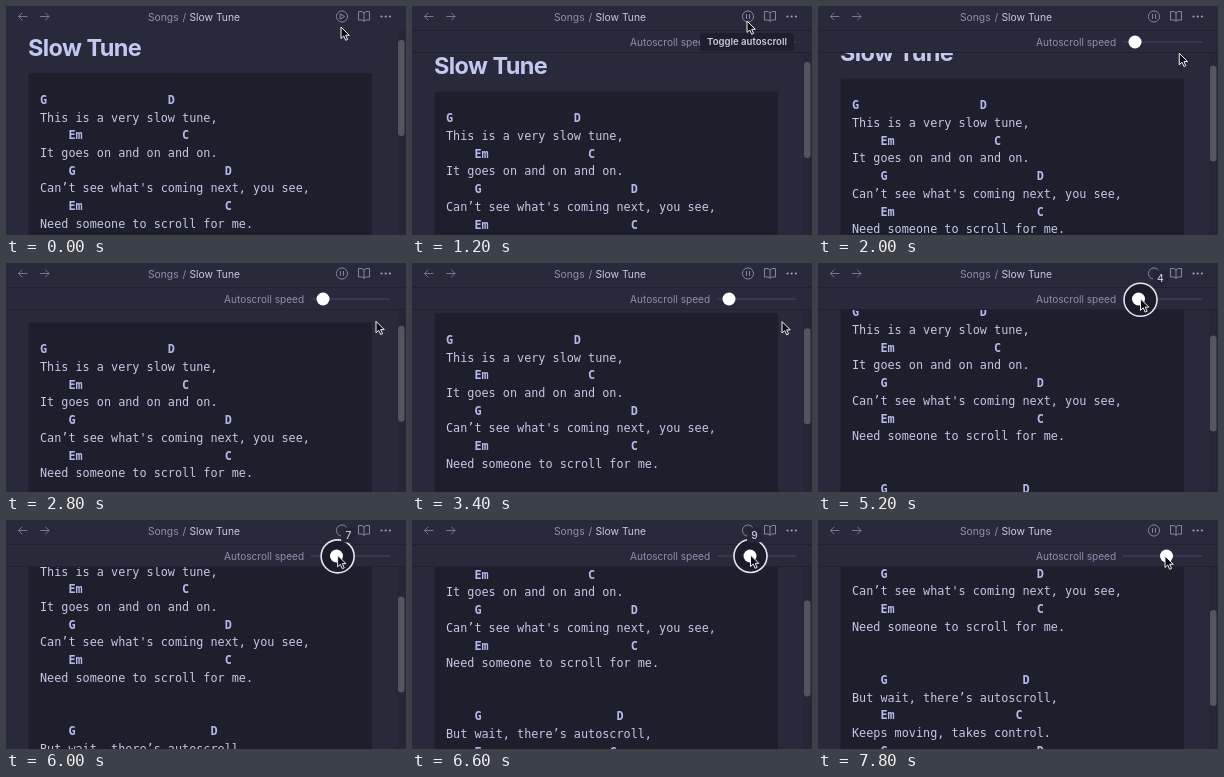
Animation of 400 by 229 pixels, one loop 8000 ms. Source, as an HTML page:

```html
<!DOCTYPE html>
<html lang="en">
<head>
<meta charset="utf-8">
<title>Autoscroll</title>
<style>
html, body { margin: 0; width: 100%; height: 100%; overflow: hidden; background: #29293c; }
svg { display: block; width: 100%; height: 100%; }
text { font-family: Inter, sans-serif; font-size: 10.3px; fill: #8f90aa; white-space: pre; }
.bright { fill: #c6c8e2; }
.title { font-size: 23.5px; font-weight: 700; letter-spacing: -.6px; fill: #c3c8f0; }
.lyric text { font-family: "DejaVu Sans Mono", monospace; font-size: 11.8px; fill: #c3c7e6; }
.lyric .chord { font-weight: 700; fill: #b5b8ec; }
.line { fill: none; stroke: #85869f; stroke-width: 1; stroke-linecap: round; stroke-linejoin: round; }
.dim { stroke: #75768f; }
</style>
</head>
<body>
<svg viewBox="0 0 400 229">
  <defs><clipPath id="clip"><rect id="view" width="400" height="229"/></clipPath></defs>
  <rect width="400" height="229" fill="#29293c"/>
  <g clip-path="url(#clip)">
    <g id="page">
      <text class="title" x="22" y="-62">Slow Tune</text>
      <rect x="22.500" y="-44.5" width="343.500" height="600" rx="2" fill="#1e1f2c"/>
      <g class="lyric" id="song"></g>
    </g>
    <rect x="391" width="9" height="229" fill="#262637"/>
    <rect id="thumb" x="392" width="6.500" height="96" rx="3.250" fill="#55555f"/>
  </g>

  <g id="bar">
    <path d="M0 24.5H400M0 46.5H400" stroke="#20212f"/>
    <text x="218" y="39.7" style="font-size:10.1px">Autoscroll speed</text>
    <path d="M305 36H384" stroke="#37384d" stroke-width="2"/>
    <circle id="halo" r="16.500" fill="#1b1c29"/>
    <circle id="knob" cy="36" r="6.5" fill="#fff"/>
  </g>

  <path class="line dim" d="M21 10.5H12.5M16 7L12.5 10.5L16 14M34.500 10.5H43M39.500 7L43 10.5L39.500 14"/>
  <text x="142" y="14.500">Songs</text>
  <text x="176.500" y="14.500">/</text>
  <text class="bright" x="183.500" y="14.500">Slow Tune</text>
  <circle class="line" cx="336" cy="10.5" r="5.6"/>
  <path id="play" class="line" d="M334.500 8L338.500 10.5L334.500 13Z"/>
  <path id="pause" class="line" d="M334.500 8.500V12.500M337.500 8.500V12.500"/>
  <path class="line" d="M358 7Q357 5.500 355 5.500H352.500V14H355.500Q357.500 14 358 15.500Q358.500 14 360.500 14H363.500V5.500H361Q359 5.500 358 7V15"/>
  <g fill="#a0a1b8"><circle cx="375.500" cy="10.5" r="1.100"/><circle cx="379.700" cy="10.5" r="1.100"/><circle cx="383.900" cy="10.5" r="1.100"/></g>

  <circle id="ring" r="16.500" fill="none" stroke="#e4e4ee" stroke-width="1.6"/>
  <g id="badge">
    <rect x="335" y="7.500" width="15" height="15" rx="3" fill="#242536"/>
    <text class="bright" id="value" x="342.500" y="18.500" text-anchor="middle" font-weight="500"></text>
  </g>
  <g id="tip">
    <path d="M331 28L335 24L339 28Z" fill="#1e1f2c"/>
    <rect x="288" y="27" width="94" height="18" rx="3.500" fill="#1e1f2c"/>
    <text class="bright" x="335" y="39" text-anchor="middle" style="font-size:9.6px;font-weight:600">Toggle autoscroll</text>
  </g>
  <path id="cursor" d="M0 0V11.500L2.700 9L4.700 13.300L6.600 12.400L4.700 8.300H8.300Z" fill="#0c0c12" stroke="#f2f2f6" stroke-width="1" stroke-linejoin="round"/>
</svg>
<script>
const LOOP = 8000, STEP = 200, ROW = 17.72, CHAR = 7.104;
const $ = id => document.getElementById(id);
const set = (id, attrs) => { for (const k in attrs) $(id).setAttribute(k, attrs[k]); };
const show = (id, on) => set(id, { visibility: on ? "visible" : "hidden" });

// Strings are lyrics; arrays hold chord, column pairs.
const song = [
  ["G", 0, "D", 18], "This is a very slow tune,",
  ["Em", 4, "C", 20], "It goes on and on and on.",
  ["G", 4, "D", 26], "Can’t see what's coming next, you see,",
  ["Em", 4, "C", 26], "Need someone to scroll for me.",
  "", "",
  ["G", 4, "D", 24], "But wait, there’s autoscroll,",
  ["Em", 4, "C", 23], "Keeps moving, takes control.",
  ["G", 4, "D", 26]
];

function write(str, col, row, cls) {
  const el = document.createElementNS("http://www.w3.org/2000/svg", "text");
  el.setAttribute("x", 34 + col * CHAR);
  el.setAttribute("y", (row - 1) * ROW + 4);
  el.setAttribute("class", cls);
  el.textContent = str;
  $("song").append(el);
}
song.forEach((line, row) => {
  if (typeof line === "string") write(line, 0, row, "words");
  else for (let i = 0; i < line.length; i += 2) write(line[i], line[i + 1], row, "chord");
});

// Keys are [time, value]; linear between them, held outside.
function at(keys, t) {
  const i = keys.findIndex(k => k[0] > t);
  if (i === 0) return keys[0][1];
  if (i < 0) return keys[keys.length - 1][1];
  const [t0, a] = keys[i - 1], [t1, b] = keys[i];
  return a + (b - a) * (t - t0) / (t1 - t0);
}

const scroll = [[1000, 133.2], [1200, 130], [2800, 104], [4200, 82], [5200, 67], [5900, 54], [6600, 37], [7200, 19.5], [7800, .5]];
const knob = [[5000, 317], [5200, 320.5], [6600, 338], [7200, 348.5]];
const cursorX = [[1400, 335], [2200, 370], [4300, 370], [4900, 321], [5200, 322.5], [6600, 338.5], [7200, 347]];
const cursorY = [[200, 21], [800, 15], [1400, 15], [2200, 58], [4300, 59], [4900, 36], [6600, 35], [7400, 36]];

function draw(t) {
  const playing = t >= 1000, drag = t >= 5000 && t < 7400;
  const top = playing ? 47 : 24;
  const y = playing ? at(scroll, t) : 111.5;
  const x = at(knob, t), cx = at(cursorX, t), cy = at(cursorY, t);

  set("view", { y: top });
  set("page", { transform: `translate(0 ${y})` });
  set("thumb", { y: playing ? 56 + (130 - y) * .2625 : 34 });
  set("knob", { cx: x });
  set("cursor", { transform: `translate(${cx} ${cy})` });
  for (const id of ["halo", "ring"]) {
    set(id, { cx, cy: cy + 1 });
    show(id, drag);
  }
  $("value").textContent = Math.round(3 + (x - 317) / 3.5);
  show("bar", playing);
  show("play", !playing);
  show("pause", playing && !drag);
  show("badge", drag);
  show("tip", t >= 600 && t < 1600);
}

function tick() {
  const t = performance.now() % LOOP;
  draw(Math.floor(t / STEP) * STEP);
  requestAnimationFrame(tick);
}
tick();
</script>
</body>
</html>
```
